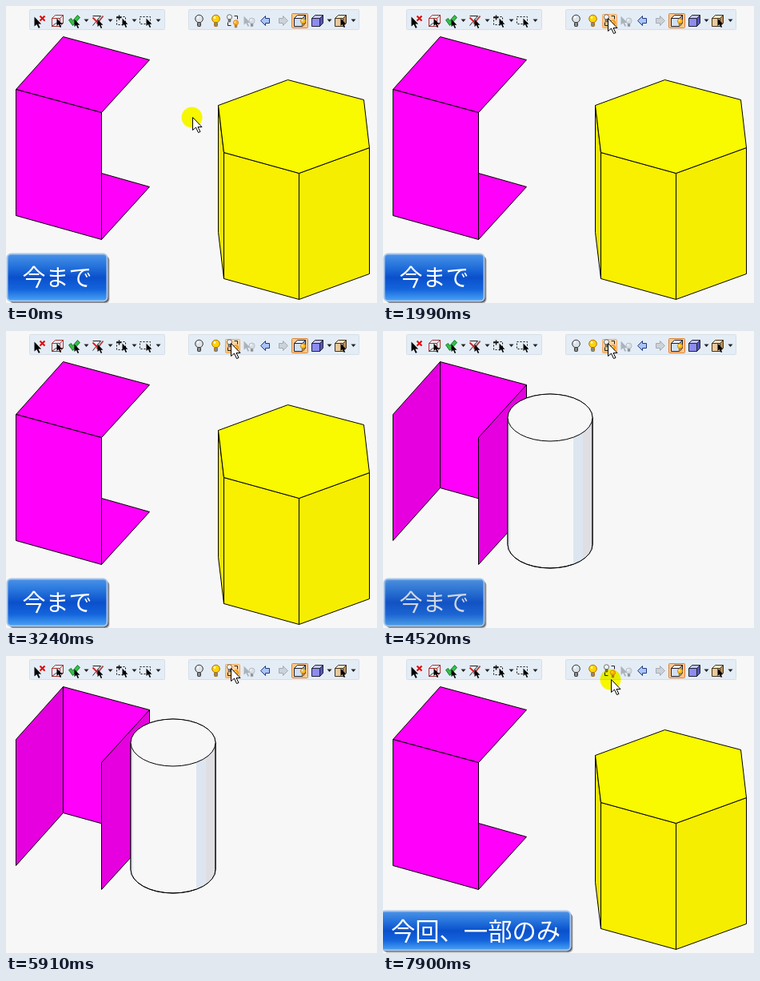
Recreate the animation shown at these times as an HTML page with a canvas. Size 464 by 372 pixels, loop 8 s.

```html
<!DOCTYPE html>
<html lang="ja">
<meta charset="utf-8">
<style>
html, body { margin: 0; width: 464px; height: 372px; overflow: hidden; background: #f7f7f7 }
canvas { display: block }
</style>
<canvas id="stage" width="464" height="372"></canvas>
<script>
const c = document.getElementById('stage').getContext('2d');
const LOOP = 8000;

function paint(fill, stroke, width = 1) {
  if (fill) { c.fillStyle = fill; c.fill(); }
  if (stroke) { c.strokeStyle = stroke; c.lineWidth = width; c.stroke(); }
}
function poly(points, fill, stroke = '#000', width = 1, open = false) {
  c.beginPath();
  for (let i = 0; i < points.length; i += 2) c.lineTo(points[i], points[i + 1]);
  if (!open) c.closePath();
  paint(fill, stroke, width);
}
function line(points, stroke, width) { poly(points, null, stroke, width, true); }
function disc(x, y, r, fill, stroke) {
  c.beginPath();
  c.arc(x, y, r, 0, 7);
  paint(fill, stroke);
}
function box(x, y, w, h, r, fill, stroke, width) {
  c.beginPath();
  c.roundRect(x, y, w, h, r);
  paint(fill, stroke, width);
}
function at(x, y, draw, scale = 1) {
  c.save();
  c.translate(x, y);
  c.scale(scale, scale);
  draw();
  c.restore();
}
function gradient(y0, y1, ...colors) {
  const g = c.createLinearGradient(0, y0, 0, y1);
  colors.forEach((color, i) => g.addColorStop(i / (colors.length - 1), color));
  return g;
}

// Toolbar icons, each centred on (0, 0)
const ARROW = [0, 0, 0, 16, 4, 12.5, 7, 19, 9.5, 18, 6.5, 12, 11.5, 12];
const pointer = (x, y, fill = '#000', scale = .6) => at(x, y, () => poly(ARROW, fill, null), scale);
const dropdown = x => poly([x - 3, 16, x + 3, 16, x, 19.5], '#222', null);
function bulb(x, y, fill, scale = 1, edge = '#333') {
  at(x, y, () => {
    disc(0, -2.5, 4.8, fill, edge);
    box(-2, 2, 4, 5, 1, '#888', edge);
    disc(-1.5, -4, 1.3, '#fff');
  }, scale);
}
function cube(front, side, top, edge) {
  poly([-7, -3, 3, -3, 3, 7, -7, 7], front, edge);
  poly([-7, -3, -3, -7, 7, -7, 3, -3], top, edge);
  poly([3, -3, 7, -7, 7, 3, 3, 7], side, edge);
}
function dashed(x, y, w, h) {
  c.setLineDash([2, 2]);
  c.strokeStyle = '#111';
  c.lineWidth = 1;
  c.strokeRect(x, y, w, h);
  c.setLineDash([]);
}
const block = (fill, edge) => poly([-6, 0, 0, -6, 0, -3, 5, -3, 5, 3, 0, 3, 0, 6], fill, edge);

const leftIcons = [
  [41, () => {
    pointer(-6, -5, '#000', .75);
    line([1, -6, 7, 0], '#e00000', 2);
    line([7, -6, 1, 0], '#e00000', 2);
  }],
  [64, () => { cube(null, null, null, '#a33'); line([-7, 7, -2, 3, 7, 3], '#333'); pointer(-1, -3); }],
  [85, () => { poly([-7, -1, -4, -3, -2, 0, 4, -7, 7, -4, -2, 6], '#35c04a', '#187a28'); pointer(0, -2); }],
  [114, () => {
    line([-6, -6, 4, -6, -6, 6], '#222');
    line([-6, -4, 0, 2], '#d22', 2);
    line([7, -6, -1, 4], '#a44', 2);
    pointer(0, -2);
  }],
  [144, () => {
    dashed(-6, -5, 11, 10);
    line([-6, -4, 0, -4], '#111', 1.5);
    line([-3, -7, -3, -1], '#111', 1.5);
    pointer(1, -3);
  }],
  [174, () => { dashed(-7, -5, 13, 9); pointer(1, -3); }]
];
const rightIcons = [
  [241, () => bulb(0, 0, '#dde3ea')],
  [262, () => bulb(0, 0, '#ffd400', 1, '#b07000')],
  [283, () => {
    bulb(-4, -3, '#eee', .65);
    bulb(4, 4, '#ffb020', .65, '#d07000');
    line([2, -6, 6, -6, 6, -2], '#222');
    line([-6, 2, -6, 6, -2, 6], '#222');
  }],
  [304, () => { pointer(-7, -6, '#aab2bb', .7); bulb(3, 2, '#d8dee5', .75, '#aab2bb'); }],
  [324, () => block('#a9c4f5', '#223a80')],
  [346, () => { c.scale(-1, 1); block('#ccd2d8', '#a4abb3'); }],
  [367, () => {
    box(-10, -9, 20, 18, 1, '#ffc88c', '#d98236');
    cube('#cfe0f4', '#8ca8cc', '#eef4fc', '#223');
    bulb(4, 2, '#ffc020', .65, '#c07000');
  }],
  [389, () => cube('#8c8cf0', '#5555b8', '#c4c4ff', '#223')],
  [418, () => { cube('#e8c99a', '#b9905c', '#f7e4c4', '#432'); pointer(0, -3); }]
];

function toolbars(hot) {
  for (const [x, w] of [[29, 169], [228, 213]]) box(x, 4, w, 25, 1, '#e4edf6', '#d4dee9');
  if (hot) box(274, 10, 18, 17, 1, gradient(10, 27, '#ffdcae', '#ffbd72'), '#f0a860');
  for (const [x, draw] of [...leftIcons, ...rightIcons]) at(x, 18, draw);
  [100, 130, 160, 190, 404, 434].forEach(dropdown);
}

function solids() {
  const pink = '#ff00fa';
  poly([119, 209, 179, 226, 119, 292], pink);
  poly([71, 38, 179, 67, 119, 133, 12, 104], pink);
  poly([12, 104, 119, 133, 119, 292, 12, 262], pink);

  poly([265, 124, 272, 183, 272, 341, 265, 283], '#eee600');
  poly([272, 183, 366, 209, 366, 367, 272, 341], '#f9f000');
  poly([366, 209, 454, 177, 454, 335, 366, 367], '#f6ee00');
  poly([352, 92, 447, 117, 454, 177, 366, 209, 272, 183, 265, 124], '#f9f900');
}

function hiddenSolids() {
  poly([71, 38, 179, 67, 179, 226, 71, 196], '#ff00fa');
  poly([12, 104, 71, 38, 71, 196, 12, 262], '#e600e0');
  poly([119, 133, 179, 67, 179, 226, 119, 292], '#e600e0');

  const x = 208.5, rx = 53, ry = 29.5;
  c.save();
  c.beginPath();
  c.ellipse(x, 108, rx, ry, 0, Math.PI, 0);
  c.ellipse(x, 267, rx, ry, 0, 0, Math.PI);
  c.closePath();
  paint('#f7f7f7', '#000');
  c.clip();
  for (const [left, w, color] of [[156, 3, '#e3e6ee'], [238, 12, '#dde6f0'], [250, 11, '#dedee3']]) {
    c.fillStyle = color;
    c.fillRect(left - .5, 108, w, 190);
  }
  c.restore();
  line([155.5, 108, 155.5, 267], '#000');
  line([261.5, 108, 261.5, 267], '#000');
  c.beginPath();
  c.ellipse(x, 267, rx, ry, 0, 0, Math.PI);
  paint(null, '#000');
  c.beginPath();
  c.ellipse(x, 108, rx, ry, 0, 0, 7);
  paint('#f7f7f7', '#000');
}

function label(text, x, y, w, h, size, alpha, ink) {
  c.save();
  c.globalAlpha = alpha;
  box(x + 3, y + 3, w, h, 5, 'rgba(0,0,0,.25)');
  box(x + 2, y + 2, w, h, 5, 'rgba(30,30,40,.6)');
  box(x, y, w, h, 5, gradient(y, y + h, '#4b93e8', '#2674dc', '#0a50cc', '#1464dc', '#4aa4f4'), '#a9c6ea', 2);
  c.font = `${size}px "Noto Sans CJK JP", "Noto Sans CJK", sans-serif`;
  c.textAlign = 'center';
  c.textBaseline = 'alphabetic';
  c.fillStyle = ink;
  c.fillText(text, x + w / 2, y + h / 2 + size * .38);
  c.restore();
}

function cursor(x, y, halo) {
  if (halo) {
    c.globalCompositeOperation = 'multiply';
    disc(x, y, 13, '#ffff00');
    c.globalCompositeOperation = 'source-over';
  }
  at(x + 1, y, () => poly(ARROW, '#fff', '#000'));
}

// Progress from 0 to 1 between two times
const span = (t, from, to) => Math.min(1, Math.max(0, (t - from) / (to - from)));
const smooth = p => p * p * (3 - 2 * p);

function cursorAt(t) {
  if (t < 6270) {
    const a = smooth(span(t, 430, 1250)), b = span(t, 1250, 1340);
    return [232 + 45 * a + 3 * b, 139 - 114 * a - 10 * b];
  }
  const a = smooth(span(t, 7200, 7900));
  return [254 + 30 * a, 98 - 69 * a];
}

function draw(t) {
  c.setTransform(1, 0, 0, 1, 0, 0);
  c.fillStyle = '#f7f7f7';
  c.fillRect(0, 0, 464, 372);
  c.translate(.5, .5);

  const swapped = t >= 2020 && t < 3240 || t >= 4240 && t < 5970;
  swapped ? hiddenSolids() : solids();

  const fade = 1 - span(t, 4240, 5180) ** 2;
  if (fade > 0) label('今まで', 1, 310, 125, 59, 29, fade, t < 4240 ? '#fff' : '#e4e4e4');
  if (t >= 6270) label('今回、一部のみ', -3, 319, 237, 49, 30.3, 1, '#fff');

  toolbars(t >= 1670 && t < 6270);
  cursor(...cursorAt(t), t < 1900 || t >= 6270);
}

function tick() {
  draw(performance.now() % LOOP);
  requestAnimationFrame(tick);
}
tick();
</script>
</html>
```
